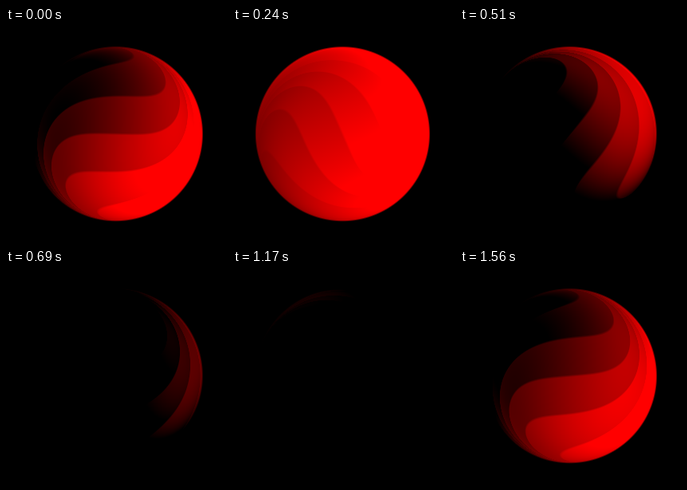
Animation, 277 px wide and 268 px high, one loop 1590 ms. Source, as an HTML page with a canvas:

```html
<!DOCTYPE html>
<html lang="en">
<head>
<meta charset="utf-8">
<title>Twisted sphere</title>
<style>
  html, body { margin: 0; width: 100%; height: 100%; overflow: hidden; background: #000; }
  canvas { display: block; width: 100vw; height: 100vh; }
</style>
</head>
<body>
<canvas id="stage" width="277" height="268"></canvas>
<script>
const W = 277, H = 268, CX = 137.4, CY = 132.7, R = 109;
const LOOP = 1590, TICK = 30;
const SEGMENT = Math.PI / 7;
const TWIST = 98 * Math.PI / 180;
const START_ANGLE = 0.175, SWAY = 0.148, SWAY_TIME = 210;

// time, light x, light y, base level
const LIGHT = [
  [0, 110, 155, 138],
  [120, 30, 178, 250],
  [360, 185, -95, 162],
  [510, 255, -20, -8],
  [690, 225, 80, -130],
  [810, 170, 20, -185],
  [1170, 35, -195, -172],
  [1350, 125, 20, -55],
  [1560, 112, 147, 114]
];

const ctx = document.getElementById("stage").getContext("2d");
const image = ctx.createImageData(W, H);
const data = image.data;
for (let i = 3; i < data.length; i += 4) data[i] = 255;

const clamp = (v, lo, hi) => Math.max(lo, Math.min(hi, v));

const points = [];
for (let y = 0; y < H; y++) {
  for (let x = 0; x < W; x++) {
    const dx = x + 0.5 - CX, dy = y + 0.5 - CY;
    const distance = Math.hypot(dx, dy);
    const cover = clamp((R - distance) / 2 + 0.5, 0, 1);
    if (!cover) continue;
    const r = Math.min(distance / R, 1);
    const z = Math.sqrt(1 - r * r);
    const twist = TWIST * Math.pow(1 - z, 1.5);
    points.push({ index: 4 * (y * W + x), r, z, twist, cover, angle: Math.atan2(dy, dx) + twist });
  }
}

// Key at any index, continued before and after the loop
function keyAt(i) {
  const count = LIGHT.length, lap = Math.floor(i / count);
  const [time, ...values] = LIGHT[i - lap * count];
  return [time + lap * LOOP, ...values];
}

// Smooth cyclic interpolation through the keys
function lightAt(time) {
  const i = LIGHT.filter(key => key[0] <= time).length - 1;
  const [k0, k1, k2, k3] = [i - 1, i, i + 1, i + 2].map(keyAt);
  const span = k2[0] - k1[0], p = (time - k1[0]) / span;
  const ease = p * p * (3 - 2 * p);
  return [1, 2, 3].map(n => {
    const m1 = span * (k2[n] - k0[n]) / (k2[0] - k0[0]);
    const m2 = span * (k3[n] - k1[n]) / (k3[0] - k1[0]);
    return k1[n] + (k2[n] - k1[n]) * ease + p * (1 - p) * (m1 * (1 - p) - m2 * p);
  });
}

function facet(longitude) {
  const f = longitude / SEGMENT, edge = Math.round(f);
  return (edge + clamp((f - edge) / 0.06, -0.5, 0.5)) * SEGMENT;
}

function turnAt(time) {
  const cycle = 2 * Math.PI / LOOP;
  return START_ANGLE + cycle * time + SWAY * Math.sin(2 * cycle * (time - SWAY_TIME));
}

function draw(time) {
  const [lx, ly, base] = lightAt(time);
  const turn = turnAt(time);
  for (const p of points) {
    const a = p.angle - turn;
    const along = p.r * Math.cos(a);
    const longitude = facet(Math.atan2(p.r * Math.sin(a), p.z));
    const across = Math.sqrt(1 - along * along) * Math.sin(longitude);
    const tilt = turn - p.twist / 2;
    const c = Math.cos(tilt), s = Math.sin(tilt);
    const level = base + lx * (along * c - across * s) + ly * (along * s + across * c);
    data[p.index] = clamp(level, 0, 255) * p.cover;
  }
  ctx.putImageData(image, 0, 0);
}

const startTime = performance.now();
let shown = -1;

function frame() {
  const elapsed = (performance.now() - startTime) % LOOP;
  const time = Math.floor(elapsed / TICK) * TICK;
  if (time !== shown) draw(shown = time);
  requestAnimationFrame(frame);
}
frame();
</script>
</body>
</html>
```
